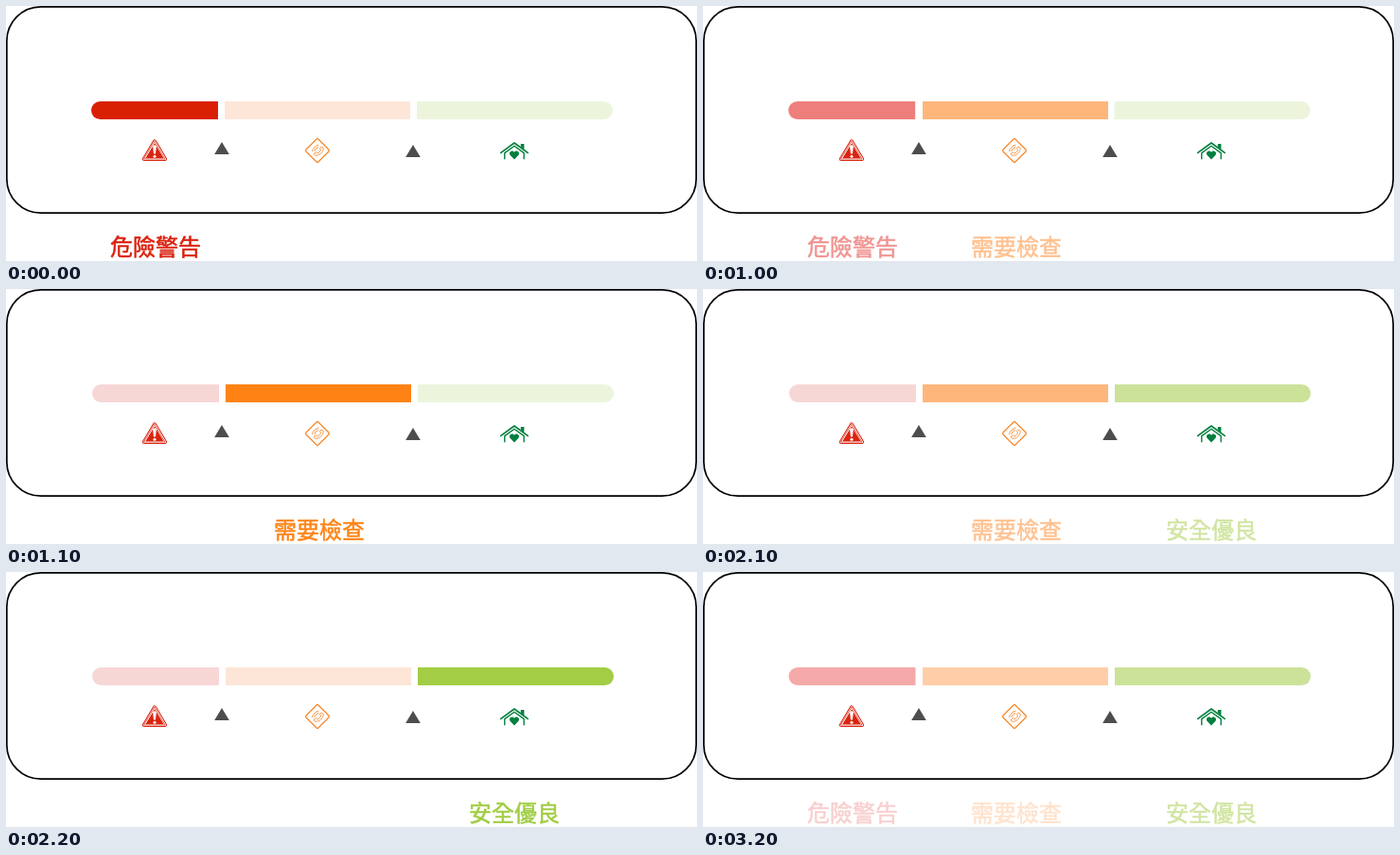
Write an HTML page with a canvas that moves like this. It is 730 by 270 pixels and loops after 3300 ms.

```html
<!DOCTYPE html>
<html lang="zh-Hant">
<head>
<meta charset="utf-8">
<style>
  html, body { margin: 0; width: 100%; height: 100%; overflow: hidden; background: #fff; }
  canvas { display: block; }
</style>
</head>
<body>
<canvas id="stage" width="730" height="270"></canvas>
<script>
const ctx = document.getElementById('stage').getContext('2d');
const LOOP = 3300;

const LABELS = [['危險警告', 110], ['需要檢查', 283], ['安全優良', 489]];
const BARS = [
  { x: 90, w: 134, radii: [9.5, 0, 0, 9.5] },
  { x: 231, w: 196, radii: 0 },
  { x: 434, w: 207, radii: [0, 9.5, 9.5, 0] }
];
const PALE = ['#f7d6d6', '#fde6d7', '#ecf5dc'];

// Per step: end time, bar colours, bar shifts, label colours (null = hidden)
const STEPS = [
  { end: 1000, bars: ['#da2004', PALE[1], PALE[2]], shift: [0, 0, 0], text: ['#da200d', null, null] },
  { end: 1100, bars: ['#ee7e7c', '#ffb67b', PALE[2]], shift: [0.2, 1, 0.6], text: ['#f09491', '#ffc08f', null] },
  { end: 2100, bars: [PALE[0], '#ff8314', PALE[2]], shift: [1, 1, 1], text: [null, '#ff8314', null] },
  { end: 2200, bars: [PALE[0], '#ffb67b', '#cce299'], shift: [1, 1, 1], text: [null, '#ffc190', '#d1e5a3'] },
  { end: 3200, bars: [PALE[0], PALE[1], '#a2cd45'], shift: [1, 1, 1], text: [null, null, '#a2cd45'] },
  { end: LOOP, bars: ['#f5aaa9', '#ffcea9', '#cce299'], shift: [0.5, 1, 1], text: ['#f8cfce', '#ffe2cc', '#d1e5a3'] }
];

function fill(path, color) {
  ctx.fillStyle = color;
  ctx.fill(new Path2D(path));
}

function stroke(path, color, width) {
  ctx.strokeStyle = color;
  ctx.lineWidth = width;
  ctx.stroke(new Path2D(path));
}

function roundRect(x, y, w, h, radii) {
  ctx.beginPath();
  ctx.roundRect(x, y, w, h, radii);
}

function drawPanel() {
  roundRect(0.85, 0.85, 728.3, 218.3, 36);
  ctx.strokeStyle = '#000';
  ctx.lineWidth = 1.7;
  ctx.stroke();
}

function drawWarning() {
  const red = '#da2410';
  const sign = 'M157 143.5L168 162H146Z';
  fill(sign, red);
  stroke(sign, red, 4.2);
  stroke(sign, '#fff', 2.2);
  stroke(sign, red, 0.7);
  fill('M157 145.5L166.5 161.3H147.5Z', red);
  fill('M155.1 148.2Q157 146.3 158.9 148.2L158 156.6H156Z', '#fff');
  ctx.beginPath();
  ctx.arc(157, 159.2, 1.5, 0, Math.PI * 2);
  ctx.fill();
}

function drawPhone() {
  const orange = '#f58220';
  ctx.save();
  ctx.translate(329, 153);
  ctx.rotate(Math.PI / 4);
  roundRect(-9.2, -9.2, 18.4, 18.4, 1.4);
  ctx.strokeStyle = orange;
  ctx.lineWidth = 1.15;
  ctx.stroke();
  ctx.restore();
  stroke('M333.2 149.2L335.2 150.2C335.8 154.5 330.5 159.3 326.3 158.2L325.2 156.2L327.4 154.8L328.8 156C330.7 155.4 332.2 153.9 332.5 152L331.7 150.8Z', orange, 0.8);
  stroke('M323.5 153.6Q324.8 148.5 330 147.2M325.8 153.4Q326.8 150.5 329.8 149.4', orange, 0.9);
}

function drawHouse() {
  const green = '#007f3e';
  fill('M543.8 146H547.4V152L543.8 149Z', green);
  stroke('M522.8 155.4L537 145L551.2 155.4', green, 1.7);
  stroke('M526.8 161.8V155.6L537 148.2L547.2 155.6V161.8', green, 1.4);
  fill('M537 162.4L532.5 157.8C530.4 155 534.6 151.5 537 154.7C539.4 151.5 543.6 155 541.5 157.8Z', green);
}

function drawBars(step) {
  BARS.forEach((bar, i) => {
    roundRect(bar.x + step.shift[i], 101, bar.w, 19, bar.radii);
    ctx.fillStyle = step.bars[i];
    ctx.fill();
  });
}

function drawLabels(step) {
  ctx.font = '400 24px "Noto Sans CJK TC", "Noto Sans CJK", sans-serif';
  ctx.lineWidth = 0.55;
  LABELS.forEach(([label, x], i) => {
    if (!step.text[i]) return;
    ctx.fillStyle = ctx.strokeStyle = step.text[i];
    ctx.fillText(label, x, 264);
    ctx.strokeText(label, x, 264);
  });
}

function draw() {
  const time = performance.now() % LOOP;
  const step = STEPS.find(s => time < s.end);
  ctx.fillStyle = '#fff';
  ctx.fillRect(0, 0, 730, 270);
  drawPanel();
  drawBars(step);
  fill('M228 144L235.8 157H220.2Z', '#4d4d4d');
  fill('M430 147L437.8 160H422.2Z', '#4d4d4d');
  drawWarning();
  drawPhone();
  drawHouse();
  drawLabels(step);
  requestAnimationFrame(draw);
}

ctx.lineJoin = 'round';
ctx.lineCap = 'round';
draw();
</script>
</body>
</html>
```
